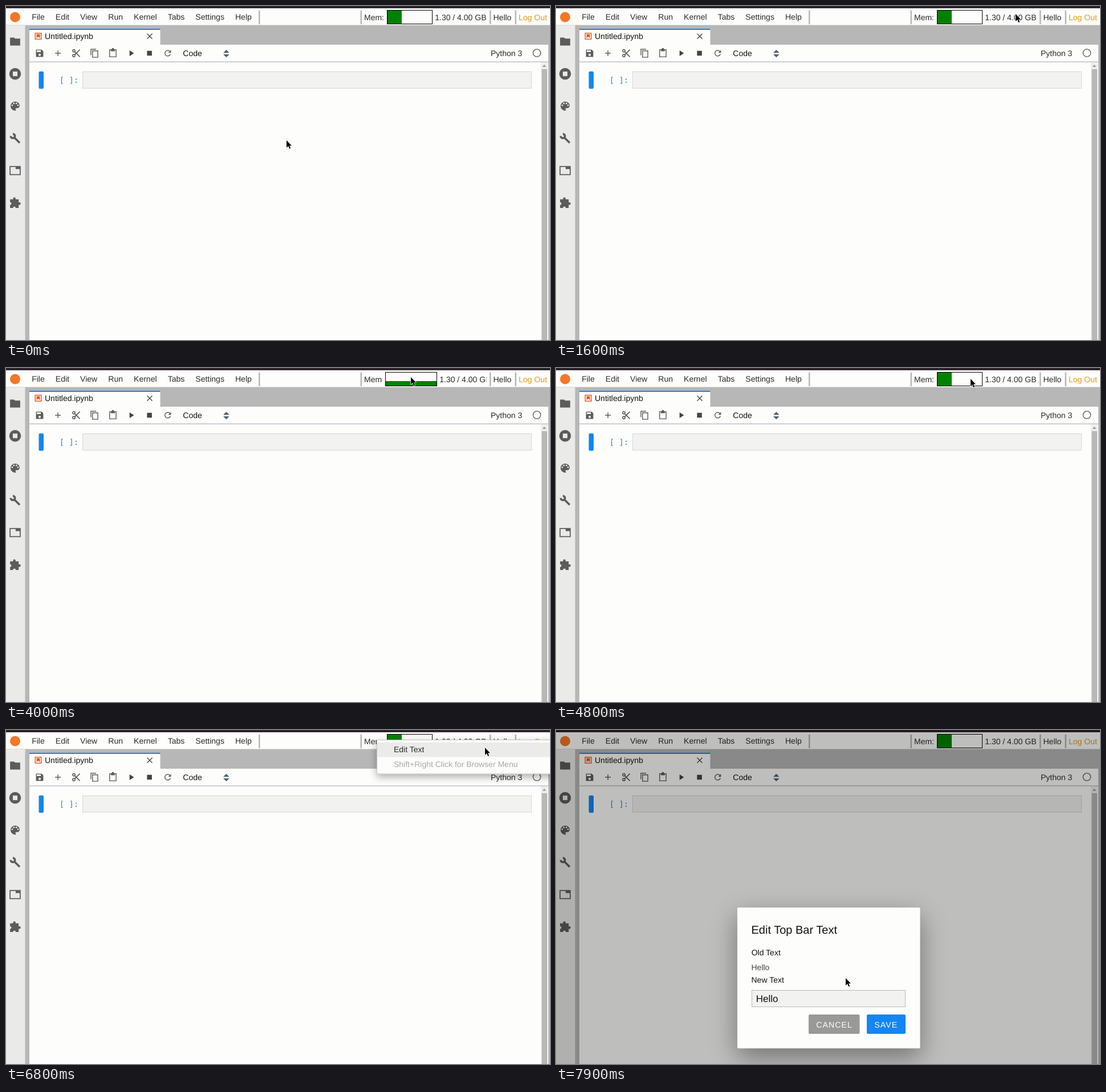
An HTML page with a canvas for the animation above (8000 ms loop, 954 by 587 pixels).

```html
<!DOCTYPE html>
<html lang="en">
<head>
<meta charset="utf-8">
<title>Notebook top bar</title>
<style>
  html, body { margin: 0; width: 100%; height: 100%; overflow: hidden; background: #fdfefb; }
  canvas { display: block; width: 954px; height: 587px; }
</style>
</head>
<body>
<canvas id="stage" width="954" height="587"></canvas>
<script>
const ctx = document.getElementById('stage').getContext('2d');
const W = 954, H = 587, LOOP = 8000, STEP = 100;
const SANS = '"Liberation Sans", Arial, sans-serif';
const MONO = '"DejaVu Sans Mono", monospace';
const PAGE = '#fdfefb', SIDE = '#eaeae9', GREY = '#b7b7b7', ICON = '#5c5c5c', FIELD = '#f2f2f0';
const BLUE = '#1485f2', INK = '#2b2b2b', DARK = '#111', ORANGE = '#f37726', FLAME = '#e8591c';

// Pointer strokes: each eases from wherever the last one ended
const START = { x: 491, y: 235 };
const MOVES = [
  { from: 200, to: 1100, x: 648, y: 20 },
  { from: 1100, to: 1300, x: 725, y: 37 },
  { from: 1500, to: 1600, x: 805, y: 13 },
  { from: 1600, to: 2400, x: 942, y: 18 },
  { from: 2400, to: 3200, x: 699, y: 7 },
  { from: 3300, to: 3500, x: 709, y: 15 },
  { from: 4100, to: 4400, x: 726, y: 18 },
  { from: 5100, to: 5400, x: 841, y: 18 },
  { from: 5500, to: 5900, x: 867, y: 15 },
  { from: 6600, to: 6800, x: 839, y: 30 },
  { from: 7300, to: 7600, x: 549, y: 22 },
  { from: 7700, to: 7900, x: 507, y: 435 }
];

const clamp01 = v => Math.min(1, Math.max(0, v));
const ease = k => k * k * (3 - 2 * k);

function pointerAt(t) {
  let { x, y } = START;
  for (const m of MOVES) {
    const k = ease(clamp01((t - m.from) / (m.to - m.from)));
    x += (m.x - x) * k;
    y += (m.y - y) * k;
  }
  return { x: Math.round(x), y: Math.round(y) };
}

function box(x, y, w, h, fill, radius = 0) {
  ctx.fillStyle = fill;
  ctx.beginPath();
  ctx.roundRect(x, y, w, h, radius);
  ctx.fill();
}

function frame(x, y, w, h, color, line = 1) {
  ctx.strokeStyle = color;
  ctx.lineWidth = line;
  ctx.strokeRect(x + line / 2, y + line / 2, w - line, h - line);
}

function text(str, x, y, color = INK, size = 14, family = SANS, spacing = 0) {
  ctx.font = `${size}px ${family}`;
  ctx.letterSpacing = spacing + 'px';
  ctx.fillStyle = color;
  ctx.fillText(str, x, y);
}

function disc(x, y, r, fill) {
  ctx.fillStyle = fill;
  ctx.beginPath();
  ctx.arc(x, y, r, 0, Math.PI * 2);
  ctx.fill();
}

// Icons are drawn on a 24-unit grid centred on (x, y)
function icon(x, y, size, { fill = '', stroke = '', line = 2, color = ICON }) {
  ctx.save();
  ctx.translate(x - size / 2, y - size / 2);
  ctx.scale(size / 24, size / 24);
  ctx.fillStyle = ctx.strokeStyle = color;
  ctx.lineWidth = line;
  ctx.fill(new Path2D(fill), 'evenodd');
  ctx.stroke(new Path2D(stroke));
  ctx.restore();
}

function panel(x, y, w, h, drop, blur, alpha) {
  ctx.save();
  ctx.shadowColor = `rgba(0,0,0,${alpha})`;
  ctx.shadowBlur = blur;
  ctx.shadowOffsetY = drop;
  box(x, y, w, h, PAGE, 2);
  ctx.restore();
}

function drawMemory(asGraph) {
  const x = asGraph ? 665 : 668, w = asGraph ? 91 : 80;
  text(asGraph ? 'Mem' : 'Mem:', 628, 25);
  box(x, 7, w, 25, PAGE);
  if (asGraph) box(x, 23, w, 9, '#008200');
  else box(x, 7, 26, 25, '#008200');
  frame(x, 7, w, 25, '#000');
  ctx.save();
  ctx.beginPath();
  ctx.rect(x + w, 4, 842.5 - x - w, 29);
  ctx.clip();
  text('1.30 / 4.00 GB', x + w + 4.2, 25);
  ctx.restore();
}

function drawTopBar(asGraph) {
  box(0, 0, W, 4, '#2b222c');
  box(0, 4, W, 29.5, PAGE);
  disc(16, 19.5, 9, ORANGE);
  let x = 45.2;
  for (const name of ['File', 'Edit', 'View', 'Run', 'Kernel', 'Tabs', 'Settings', 'Help']) {
    text(name, x, 24);
    x += ctx.measureText(name).width + 19.1;
  }
  for (const sep of [443, 621.5, 848, 892.5]) box(sep, 8, 2.5, 24, GREY);
  drawMemory(asGraph);
  text('Hello', 854.5, 25);
  text('Log Out', 899, 25, '#e39a1c');
}

function drawSidebar() {
  box(0, 34, 33.5, H - 34, SIDE);
  const icons = [
    { fill: 'M2 4h8l2 2h10v14H2z' },
    { fill: 'M12 .4a11.6 11.6 0 0 1 0 23.2 11.6 11.6 0 0 1 0-23.2zM7.5 7.5h9v9h-9z' },
    { fill: 'M12 3a9 9 0 0 0 0 18c2 0 2-1.5 1-2.5s0-2.5 1-2.5h2a5 5 0 0 0 5-5 9 8 0 0 0-9-8z' },
    { stroke: 'M7.5 3.3A4.2 4.2 0 1 1 3.3 7.5M10 10L21 21', line: 4 },
    { stroke: 'M2 4h20v16H2z', fill: 'M13 4h9v5h-9z' },
    { fill: 'M2 5h6V3.5a2.5 2.5 0 0 1 5 0V5h6v6h1.5a2.5 2.5 0 0 1 0 5H19v6h-5.8a2.7 2.7 0 0 0-5.4 0H2v-5.8a2.7 2.7 0 0 0 0-5.4z' }
  ];
  icons.forEach((shape, i) => icon(16, 62.5 + i * 56.7, 21.3, shape));
  // Paint wells on the palette
  for (let i = 0; i < 4; i++) {
    const a = Math.PI * (1.08 + i * .28);
    disc(16 + 5.2 * Math.cos(a), 175.9 + 5.2 * Math.sin(a), 1.35, SIDE);
  }
}

function drawTab() {
  box(41, 40, 229.5, 28, PAGE);
  box(41, 40, 229.5, 2, BLUE);
  icon(56.5, 53, 12, { fill: 'M6 5h12v14l-6-5-6 5z', color: FLAME });
  frame(50.5, 47, 12, 12, FLAME, 1.4);
  text('Untitled.ipynb', 68, 58, DARK);
  icon(252, 53.2, 12, { stroke: 'M3 3L21 21M21 3L3 21', line: 2.6, color: '#444' });
}

function drawToolbar() {
  box(41, 68, 910, 30, PAGE);
  box(41, 97.6, 910, 1.4, '#c2bfc8');
  const icons = [
    { fill: 'M3 3h14l4 4v14H3zM5 5h10v4H5zM12 13a3 3 0 0 1 0 6 3 3 0 0 1 0-6z' },
    { stroke: 'M12 5v14M5 12h14' },
    { stroke: 'M6 3a3 3 0 0 1 0 6 3 3 0 0 1 0-6zM6 15a3 3 0 0 1 0 6 3 3 0 0 1 0-6zM8 8L21 21M8 16L21 3', line: 2.3 },
    { stroke: 'M3 17V2h13M7 6h13v16H7z' },
    { stroke: 'M4 3h16v18H4z', fill: 'M7 2h2a3 3 0 0 1 6 0h2v5H7z' },
    { fill: 'M8 5v14l11-7z', color: '#444' },
    { fill: 'M6 6h12v12H6z', color: '#444' },
    { stroke: 'M17 7A7 7 0 1 0 18.6 14', fill: 'M20 4v7h-7z' }
  ];
  icons.forEach((shape, i) => icon(59 + i * 32.1, 83, 17, shape));
  text('Code', 310.3, 87.5, DARK);
  icon(386.3, 83.7, 16, { fill: 'M4 10l8-8 8 8zM4 14l8 8 8-8z', color: '#4d6178' });
  text('Python 3', 850, 87.5);
  icon(931, 82.5, 16, { stroke: 'M12 2a10 10 0 0 1 0 20 10 10 0 0 1 0-20z' });
}

function drawNotebook() {
  box(41, 99, 910, H - 99, PAGE);
  box(938, 99, 12, H - 99, '#eeeeed');
  box(939.5, 111, 9.5, H - 111, GREY);
  icon(944, 105, 8, { fill: 'M2 18l10-12 10 12z', color: '#999' });
  box(57.5, 115, 8.5, 30.5, BLUE, 2);
  text('[ ]:', 93.8, 134.5, '#307fc1', 13.87, MONO);
  box(134, 115, 788, 30, FIELD);
  frame(134, 115, 788, 30, '#d6d6d4');
}

function drawMenu(hover) {
  panel(650, 17, 320, 60.5, 5, 14, .32);
  frame(650, 17, 320, 60.5, '#c4c4c4');
  if (hover) box(651, 22, 303, 25.5, '#ebebea');
  text('Edit Text', 680, 39);
  text('Shift+Right Click for Browser Menu', 680, 65, '#a8a8a6');
}

function button(label, x, w, fill) {
  box(x, 500, w, 34, fill, 2);
  text(label, x + 13.3, 523, PAGE, 14.2, SANS, 1);
}

function drawDialog() {
  box(0, 0, W, H, 'rgba(0,0,0,.25)');
  panel(318, 312, 320.5, 247.5, 16, 46, .4);
  text('Edit Top Bar Text', 342.5, 358, DARK, 20);
  text('Old Text', 342.7, 395.5, DARK);
  text('Hello', 342.5, 422, '#444');
  text('New Text', 342.5, 444, DARK);
  box(343, 457, 270, 30, FIELD);
  frame(343, 457, 270, 30, '#b9b9b9');
  text('Hello', 350.8, 478, DARK, 17);
  button('CANCEL', 443, 89.5, '#999');
  button('SAVE', 545, 68, BLUE);
}

function drawPointer({ x, y }) {
  const arrow = new Path2D('M1 1v13l3-3 2.2 5 2-1-2.2-4.6h4z');
  ctx.save();
  ctx.translate(x, y);
  ctx.lineJoin = 'round';
  ctx.lineWidth = 1.4;
  ctx.strokeStyle = '#fff';
  ctx.stroke(arrow);
  ctx.fillStyle = '#000';
  ctx.fill(arrow);
  ctx.restore();
}

function render(now) {
  const t = Math.floor((now % LOOP) / STEP) * STEP;
  ctx.textRendering = 'geometricPrecision';
  box(0, 0, W, H, GREY);
  drawTopBar(t >= 4000 && t < 4700);
  drawSidebar();
  drawTab();
  drawToolbar();
  drawNotebook();
  if (t >= 7300) drawDialog();
  else if (t >= 6500) drawMenu(t >= 6700);
  drawPointer(pointerAt(t));
}

function tick() {
  render(performance.now());
  requestAnimationFrame(tick);
}
tick();
</script>
</body>
</html>
```
